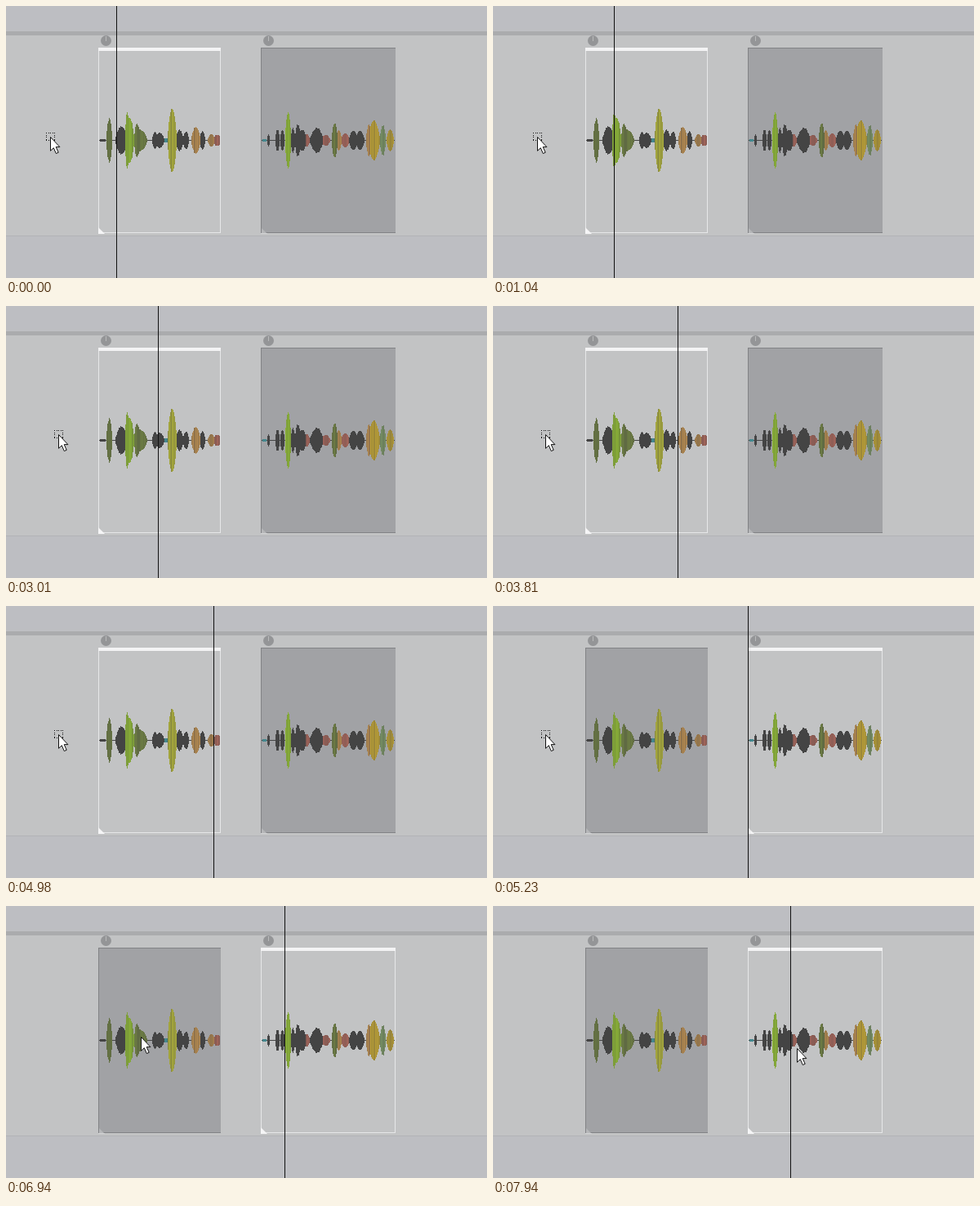
An HTML page that plays this animation: 589x333 px, repeating every 8 s.

```html
<!DOCTYPE html>
<html lang="en">
<head>
<meta charset="utf-8">
<title>Clip playback</title>
<style>
html, body { margin: 0; width: 100%; height: 100%; overflow: hidden; background: #bdbec2; }
svg { display: block; width: 589px; height: 333px; }
rect { shape-rendering: crispEdges; }
.head, .pointer, .marquee, .on, .off { animation: 8s step-end infinite; }
.head { animation-name: head; }
.pointer { animation-name: pointer; }
.marquee { animation-name: marquee; }
.first .on, .second .off { animation-name: early; }
.first .off, .second .on { animation-name: late; }

@keyframes early { 0% { visibility: visible } 65.375%, 100% { visibility: hidden } }
@keyframes late { 0% { visibility: hidden } 65.375%, 100% { visibility: visible } }
@keyframes marquee { 0% { visibility: visible } 82.75%, 100% { visibility: hidden } }

@keyframes head {
  0% { transform: translateX(135px) }
  1.5% { transform: translateX(137px) }
  8.375% { transform: translateX(147px) }
  13% { transform: translateX(148px) }
  16.5% { transform: translateX(157px) }
  21.875% { transform: translateX(160px); animation-timing-function: steps(2) }
  29.125% { transform: translateX(178px); animation-timing-function: steps(2) }
  34.125% { transform: translateX(186px) }
  39.125% { transform: translateX(199px) }
  43.75% { transform: translateX(220px) }
  47.625% { transform: translateX(226px) }
  54.5% { transform: translateX(239px); animation-timing-function: steps(3) }
  62.25% { transform: translateX(254px) }
  65.375% { transform: translateX(312px) }
  75.375% { transform: translateX(330px) }
  78.75% { transform: translateX(332px); animation-timing-function: steps(3) }
  86.75% { transform: translateX(341px) }
  90.125% { transform: translateX(343px) }
  95.5% { transform: translateX(356px); animation-timing-function: steps(2) }
  99.25%, 100% { transform: translateX(364px) }
}

@keyframes pointer {
  0% { transform: translate(54px, 160px) }
  16.5% { transform: translate(57px, 160px) }
  29.125% { transform: translate(60px, 160px) }
  34.125% { transform: translate(64px, 157px) }
  66.875% { transform: translate(67px, 157px) }
  70.375% { transform: translate(67px, 154px) }
  78.75% { transform: translate(69px, 154px); animation-timing-function: steps(3) }
  86.75% { transform: translate(165px, 160px) }
  95.5% { transform: translate(206px, 164px); animation-timing-function: steps(2) }
  99.25%, 100% { transform: translate(372px, 174px) }
}
</style>
</head>
<body>
<svg viewBox="0 0 589 333">
  <rect width="589" height="333" fill="#bdbec2"/>
  <rect y="31" width="589" height="5" fill="#aaabad"/>
  <rect y="36" width="589" height="245" fill="#c2c3c4"/>
  <rect y="281" width="589" height="1" fill="#b2b3b6"/>
  <g id="clips"></g>
  <rect class="head" width="1" height="333" fill="#111"/>
  <g class="pointer">
    <path class="marquee" d="M-5 -4.5H6M-5 4.5H6M-4.5 -5V5M5.5 -5V5" fill="none" stroke="#111"
      stroke-dasharray="1 1.5" shape-rendering="crispEdges"/>
    <path d="M.5 .5V17.3L4.3 13.7L7.3 20.6L10.2 19.3L7.2 12.6H11.9Z" fill="#fff" stroke="#111"/>
  </g>
</svg>
<script>
const MID = 164.5;
const DARK = '#444', TEAL = '#459098', OLIVE = '#6c7c43', GREEN = '#8cb536', LIME = '#a8aa3c',
  GOLD = '#bda236', ORANGE = '#b58a50', RED = '#a5655a', SAGE = '#789365';

// A sound is a run of lobes: [centre, half width, height, colour].
const clips = [
  {
    name: 'first', x: 113, width: 150,
    lobes: [
      [118, 5, 2, DARK], [126, 4, 28, OLIVE], [141, 8, 18, DARK], [148, 3, 36, GREEN], [151, 6, 29, GREEN],
      [160, 4, 22, OLIVE], [164, 9, 14, OLIVE], [182, 4, 11, DARK], [188, 6, 10, DARK], [196, 4, 3, TEAL],
      [203, 6, 41, LIME], [212, 5, 14, DARK], [220, 4, 12, DARK], [232, 6, 18, ORANGE], [240, 4, 12, DARK],
      [251, 5, 8, ORANGE], [258, 6, 7, RED]
    ]
  },
  {
    name: 'second', x: 312, width: 165,
    lobes: [
      [316, 4, 2, TEAL], [321, 2, 8, DARK], [332, 3, 14, DARK], [338, 3, 14, DARK], [345, 4, 35, GREEN],
      [351, 3, 16, DARK], [357, 4, 21, DARK], [362, 6, 14, DARK], [368, 4, 8, RED], [380, 9, 16, DARK],
      [391, 6, 7, RED], [402, 4, 23, OLIVE], [407, 4, 13, ORANGE], [415, 6, 9, RED], [425, 6, 13, DARK],
      [433, 6, 12, DARK], [444, 4, 20, ORANGE], [450, 8, 25, GOLD], [461, 4, 20, SAGE], [470, 5, 14, GOLD]
    ]
  }
];

let seed = 7;
const random = () => (seed = seed * 16807 % 2147483647) / 2147483647;

const box = (x, y, w, h, fill) => `<rect x="${x}" y="${y}" width="${w}" height="${h}" fill="${fill}"/>`;

const frame = (x, w, color, right = color) =>
  box(x, 51, 1, 227, color) + box(x + w - 1, 51, 1, 227, right) +
  box(x, 51, w, 1, color) + box(x, 277, w, 1, color);

const corner = (x, size, color) => `<path d="M${x} ${279 - size}l${size} ${size}h${-size}z" fill="${color}"/>`;

// The tallest lobe at x decides both the height and the colour of a column.
function column(x, lobes) {
  let height = 1, color = DARK;
  for (const [centre, half, peak, tone] of lobes) {
    const h = peak * (1 - ((x - centre) / half) ** 2);
    if (h > height) [height, color] = [h, tone];
  }
  height *= 0.88 + 0.12 * random();
  const shade = Math.round(35 * random());
  return box(x, MID - height, 1, 2 * height, `color-mix(in srgb, ${color}, ${DARK} ${shade}%)`);
}

function drawClip({ name, x, width, lobes }) {
  const wave = Array.from({ length: width - 2 }, (_, i) => column(x + 1 + i, lobes)).join('');
  return `<g class="${name}">
    <circle cx="${x + 9.5}" cy="42.5" r="6.5" fill="#949597"/>
    ${box(x + 9, 37, 1, 6, '#b9babb')}
    <g class="off">${box(x, 51, width, 227, '#a1a2a5')}${frame(x, width, '#828386', '#a1a2a5')}
      ${corner(x + 1, 7, '#b6b7b9')}${box(x, 278, 8, 1, '#d2d3d4')}</g>
    <g class="on">${box(x, 51, width, 227, '#c2c3c4')}${frame(x, width, '#e6e7e8')}
      ${box(x, 51, width, 4, '#f3f3f4')}${corner(x, 8, '#f5f5f6')}</g>
    ${wave}
  </g>`;
}

document.getElementById('clips').innerHTML = clips.map(drawClip).join('');
</script>
</body>
</html>
```
